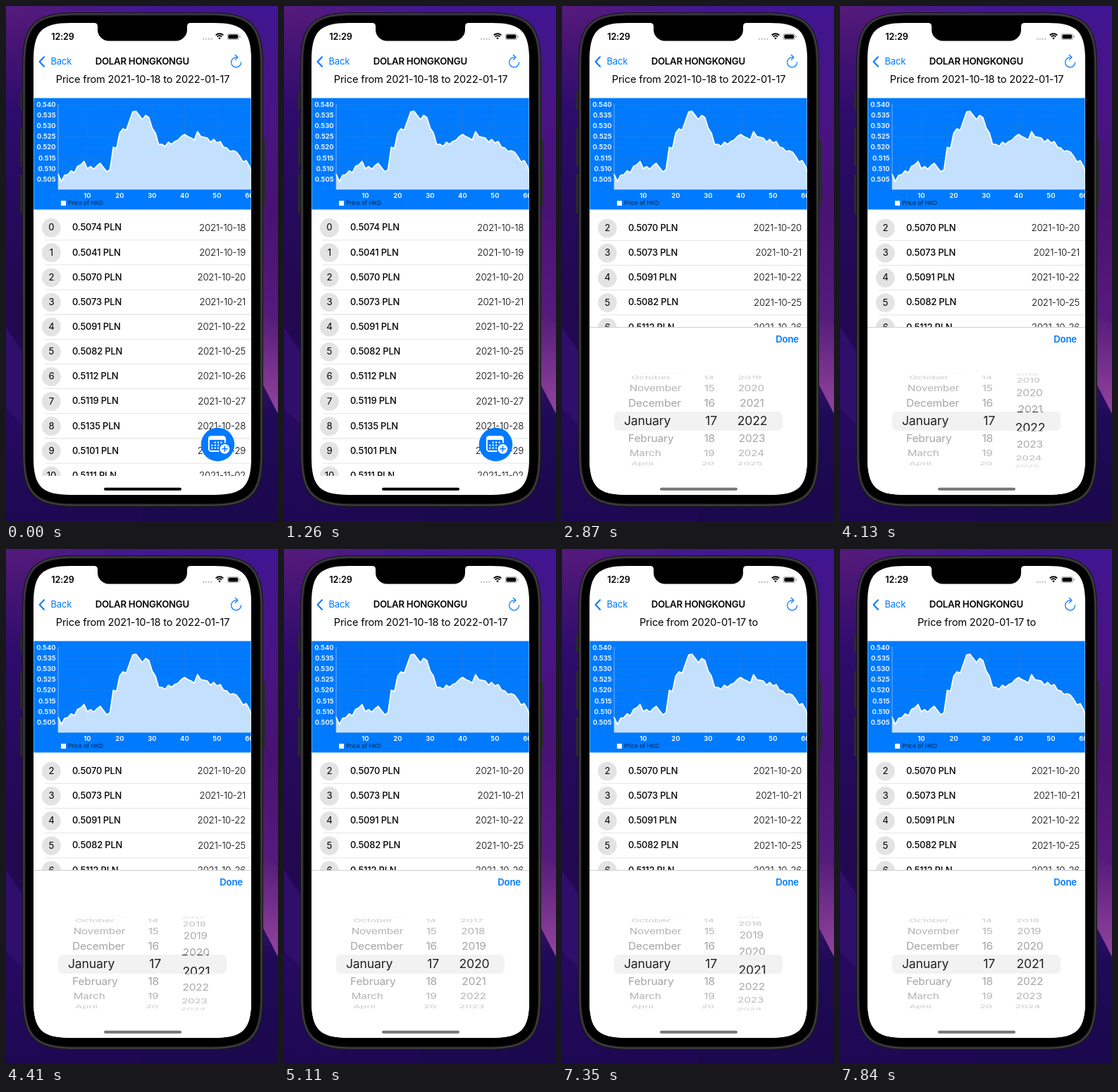
Animation, 386 px wide and 730 px high, one loop 8000 ms. Source, as an HTML page with a canvas:

```html
<!DOCTYPE html>
<html lang="en">
<head>
<meta charset="utf-8">
<title>Currency price history</title>
<style>
html, body { margin: 0; height: 100%; overflow: hidden; background: #1d0848; }
canvas { display: block; width: 386px; height: 730px; }
</style>
</head>
<body>
<canvas id="stage"></canvas>
<script>
const W = 386, H = 730, LOOP = 8000, TICK = 70;
const BLUE = '#007aff';
const canvas = document.getElementById('stage');
const ctx = canvas.getContext('2d');
const dpr = window.devicePixelRatio || 1;
canvas.width = W * dpr;
canvas.height = H * dpr;

const prices = [5074, 5041, 5070, 5073, 5091, 5082, 5112, 5119, 5135, 5101, 5111, 5099, 5115, 5126];
const dates = ['10-18', '10-19', '10-20', '10-21', '10-22', '10-25', '10-26', '10-27', '10-28', '10-29',
  '11-02', '11-03', '11-04', '11-05'];
// Chart heights in pixels that continue the listed prices
const later = [229, 235, 232, 200, 202, 180, 174, 176, 163, 150, 149, 155, 161, 155, 158, 173, 180, 196, 196,
  199, 193, 196, 192, 190, 185, 182, 185, 187, 190, 178, 185, 186, 187, 193, 189, 194, 192, 200, 201, 206,
  205, 207, 213, 221, 219, 227, 240];
const curve = prices.map(p => 246 - (p - 5050) * 0.303).concat(later);
const months = ['January', 'February', 'March', 'April', 'May', 'June', 'July', 'August', 'September',
  'October', 'November', 'December'];

const mod = (n, m) => ((n % m) + m) % m;
const progress = (t, from, to) => Math.min(1, Math.max(0, (t - from) / (to - from)));
const easeOut = (p, power) => 1 - (1 - p) ** power;

function text(str, x, y, size, { color = '#000', weight = 400, align = 'left', spacing = -0.15 } = {}) {
  ctx.font = `${weight} ${size}px Inter, sans-serif`;
  ctx.letterSpacing = spacing + 'px';
  ctx.textAlign = align;
  ctx.textBaseline = 'middle';
  ctx.fillStyle = color;
  ctx.fillText(str, x, y);
}

function box(x, y, w, h, radius, color) {
  ctx.beginPath();
  ctx.roundRect(x, y, w, h, radius);
  ctx.fillStyle = color;
  ctx.fill();
}

// Rectangle path with continuous-curvature corners, as on the phone body
function smoothRect(x, y, w, h, radius) {
  const e = 1.4 * radius, c = 0.31 * radius, r = x + w, b = y + h;
  ctx.beginPath();
  ctx.moveTo(x + e, y);
  ctx.lineTo(r - e, y);
  ctx.bezierCurveTo(r - c, y, r, y + c, r, y + e);
  ctx.lineTo(r, b - e);
  ctx.bezierCurveTo(r, b - c, r - c, b, r - e, b);
  ctx.lineTo(x + e, b);
  ctx.bezierCurveTo(x + c, b, x, b - c, x, b - e);
  ctx.lineTo(x, y + e);
  ctx.bezierCurveTo(x, y + c, x + c, y, x + e, y);
}

function disc(x, y, r, color) {
  ctx.beginPath();
  ctx.arc(x, y, r, 0, 7);
  ctx.fillStyle = color;
  ctx.fill();
}

function line(points, color, width) {
  ctx.beginPath();
  points.forEach(([x, y]) => ctx.lineTo(x, y));
  ctx.strokeStyle = color;
  ctx.lineWidth = width;
  ctx.stroke();
}

function shape(points, color) {
  ctx.beginPath();
  points.forEach(([x, y]) => ctx.lineTo(x, y));
  ctx.fillStyle = color;
  ctx.fill();
}

function clipped(x, y, w, h, radius, draw) {
  ctx.save();
  ctx.beginPath();
  ctx.roundRect(x, y, w, h, radius);
  ctx.clip();
  draw();
  ctx.restore();
}

function gradient(x0, y0, x1, y1, colors) {
  const g = ctx.createLinearGradient(x0, y0, x1, y1);
  colors.forEach((c, i) => g.addColorStop(i / (colors.length - 1), c));
  return g;
}

function drawWallpaper() {
  box(0, 0, 193, H, 0, gradient(0, 0, 0, H, ['#551a7a', '#2e0c6c', '#250a5c', '#21084f', '#260a60', '#1d0852']));
  box(193, 0, 193, H, 0, gradient(0, 0, 0, H, ['#401590', '#481484', '#481272', '#551a7d', '#1f0a58', '#1b084c']));
  box(0, 0, W, 12, 0, gradient(0, 0, W, 0, ['#551a7a', '#40188f', '#3f1592']));
  shape([[0, 455], [30, 500], [30, 600], [0, 570]], '#300e6c');
  shape([[355, 420], [386, 450], [386, 578], [355, 518]], gradient(0, 420, 0, 570, ['#4d1674', '#8f429c']));
}

function drawPhone() {
  [[121, 26], [173, 54], [238, 56]].forEach(([y, h]) => box(20, y, 5, h, 1.5, '#29292b'));
  box(363, 189, 5, 94, 1.5, '#29292b');
  ['#19191b', '#434345', '#29292b', '#000'].forEach((color, i) => {
    const inset = i * 1.5;
    smoothRect(23 + inset, 9 + inset, 342 - 2 * inset, 701 - 2 * inset, 54 - inset);
    ctx.fillStyle = color;
    ctx.fill();
  });
}

function drawStatusBar() {
  ctx.beginPath();
  ctx.moveTo(125, 24);
  ctx.quadraticCurveTo(130, 24, 130, 29);
  ctx.lineTo(130, 33);
  ctx.arcTo(130, 49.4, 146, 49.4, 16);
  ctx.lineTo(241, 49.4);
  ctx.arcTo(257, 49.4, 257, 33, 16);
  ctx.lineTo(257, 29);
  ctx.quadraticCurveTo(257, 24, 262, 24);
  ctx.fillStyle = '#000';
  ctx.fill();

  text('12:29', 80.5, 44, 12.6, { weight: 600, align: 'center' });
  for (let i = 0; i < 4; i++) disc(280 + i * 3.8, 46.7, 1.2, '#c4c4c6');
  ctx.strokeStyle = '#000';
  ctx.lineWidth = 1.9;
  [8, 5].forEach(r => {
    ctx.beginPath();
    ctx.arc(303, 47.3, r, -2.3, -0.84);
    ctx.stroke();
  });
  shape([[301.2, 45.3], [303, 44.6], [304.8, 45.3], [303, 47.4]], '#000');
  box(313.8, 39, 17, 9, 2.8, '#a0a0a0');
  box(314.6, 39.8, 15.4, 7.4, 2.2, '#fff');
  box(315.4, 40.6, 13.8, 5.8, 1.6, '#000');
  box(331.6, 42, 1.2, 3, 0.6, '#a0a0a0');
}

function drawHeader(caption) {
  ctx.lineCap = ctx.lineJoin = 'round';
  line([[54, 72.2], [47.6, 79], [54, 85.8]], BLUE, 2);
  text('Back', 63.4, 79, 13, { color: BLUE });
  text('DOLAR HONGKONGU', 193.3, 79, 13.2, { weight: 600, align: 'center', spacing: -0.25 });
  ctx.beginPath();
  ctx.arc(326.6, 79.8, 7, 0, 4.8);
  ctx.strokeStyle = BLUE;
  ctx.lineWidth = 1.2;
  ctx.stroke();
  line([[325.2, 69.2], [329, 72.8], [325.2, 76.4]], BLUE, 1.2);
  text(caption, 194, 105, 14.6, { align: 'center', spacing: -0.17 });
}

function drawChart() {
  const left = 74, bottom = 260, grid = 'rgba(128,128,128,.26)';
  const points = curve.map((y, i) => [left + i * 4.6, y]);
  box(39.4, 130.4, 308.2, 158.2, 0, BLUE);
  for (let i = 0; i < 8; i++) {
    const y = 140 + i * 15.15;
    line([[left, y], [348, y]], grid, 0.8);
    text((0.54 - i * 0.005).toFixed(3), 70.5, y, 9.5, { color: '#fff', weight: 600, align: 'right', spacing: 0 });
  }
  for (let i = 1; i <= 6; i++) {
    const x = 69.4 + i * 46;
    line([[x, 139], [x, bottom]], grid, 0.8);
    text(i * 10, x, 269, 9.5, { color: '#fff', weight: 600, align: 'center', spacing: 0 });
  }
  shape([[left, bottom], ...points, [360, bottom]], 'rgba(255,255,255,.77)');
  line(points, '#fff', 1.7);
  line([[left, 139], [left, bottom], [348, bottom]], 'rgba(200,215,235,.7)', 0.8);
  box(78, 276, 7, 7, 0, '#fff');
  text('Price of HKD', 88, 279.7, 8.2, { color: '#04213f', spacing: 0 });
}

function drawList(offset) {
  clipped(39, 298, 309, 368, 0, () => {
    prices.forEach((price, i) => {
      const y = 314.5 + i * 35.15 - offset;
      if (y < 270 || y > 690) return;
      disc(64.3, y, 13.4, '#e3e3e3');
      text(i, 64.4, y, 13.2, { align: 'center' });
      text(`0.${price} PLN`, 94, y, 12.9, { weight: 500, spacing: -0.15 });
      text('2021-' + dates[i], 340, y, 13.3, { weight: 300, align: 'right', spacing: -0.27 });
      box(55, y + 16.9, 293, 0.8, 0, '#dcdcde');
    });
  });
}

function drawCalendarButton(alpha) {
  disc(300.5, 621.6, 23.8, BLUE);
  ctx.save();
  ctx.globalAlpha = alpha;
  ctx.beginPath();
  ctx.roundRect(287.9, 610.4, 23, 20.6, 3.5);
  ctx.strokeStyle = '#fff';
  ctx.lineWidth = 1.9;
  ctx.stroke();
  box(287, 609.5, 24.8, 5.4, [3.5, 3.5, 0, 0], '#fff');
  for (let row = 0; row < 3; row++)
    for (let col = 0; col < 4; col++)
      if (row + col) box(291.2 + col * 4.4, 617.4 + row * 4, 2.3, 2.3, 0.7, '#fff');
  ctx.restore();
  disc(310.4, 627.8, 8.6, BLUE);
  ctx.save();
  ctx.globalAlpha = alpha;
  disc(310.4, 627.8, 6.9, '#fff');
  ctx.restore();
  line([[306.8, 627.8], [314, 627.8]], BLUE, 1.5);
  line([[310.4, 624.2], [310.4, 631.4]], BLUE, 1.5);
}

// One picker column, its rows placed around a horizontal cylinder
function drawWheel({ x, align, pos, label }, shade) {
  for (let k = Math.floor(pos) - 4; k <= Math.ceil(pos) + 4; k++) {
    const angle = (k - pos) * 0.384, c = Math.cos(angle);
    if (Math.abs(angle) > 1.56) continue;
    const s = 1 - 0.08 * (1 - c);
    ctx.save();
    ctx.translate(193, 588.5 + 66.7 * Math.sin(angle));
    ctx.scale(s, c);
    text(label(k), x - 193, 0, 15.6, { color: shade(c), align });
    ctx.restore();
  }
}

function drawSheet(dy, year, doneAlpha) {
  const columns = [
    { x: 93.5, align: 'left', pos: 0, label: k => months[mod(k, 12)], lens: 136 },
    { x: 217.2, align: 'right', pos: 17, label: k => k, lens: 196 },
    { x: 270, align: 'center', pos: year, label: k => k, lens: 270 }
  ];
  ctx.save();
  ctx.translate(0, dy);
  box(39, 455, 309, 240, 0, '#fff');
  box(39, 455, 309, 0.9, 0, '#cfcfd1');
  ctx.globalAlpha = doneAlpha;
  text('Done', 336, 472.7, 13.2, { color: BLUE, weight: 600, align: 'right' });
  ctx.globalAlpha = 1;
  clipped(39, 517.5, 309, 141, 0, () =>
    columns.forEach(col => drawWheel(col, c => `rgba(0,0,0,${0.1 + 0.28 * c})`)));
  clipped(74, 575, 239, 27, 6.5, () => {
    box(74, 575, 239, 27, 0, '#f2f2f3');
    columns.forEach(col => {
      ctx.save();
      ctx.translate(col.lens, 588.5);
      ctx.scale(1.13, 1.13);
      ctx.translate(-col.lens, -588.5);
      drawWheel(col, () => '#222');
      ctx.restore();
    });
  });
  ctx.restore();
}

function draw(t) {
  const scroll = 69.7 * easeOut(progress(t, 1330, 1540), 1.6);
  const sheet = easeOut(progress(t, 2520, 2870), 3);
  const forward = progress(t, 7070, 7840);
  const year = 2022 - 2 * easeOut(progress(t, 4060, 5250), 3.36) + easeOut(forward, 2.6);
  const iconAlpha = t < 2450 ? 1 : 0.3 + 0.7 * progress(t, 2590, 3000);
  const doneAlpha = t < 5810 ? 1 : 0.3 + 0.7 * progress(t, 5880, 6370);
  const caption = t < 5950 ? 'Price from 2021-10-18 to 2022-01-17' : 'Price from 2020-01-17 to';

  ctx.setTransform(dpr, 0, 0, dpr, 0, 0);
  drawWallpaper();
  drawPhone();
  ctx.save();
  smoothRect(39, 24, 309, 669, 38);
  ctx.clip();
  box(39, 24, 309, 669, 0, '#fff');
  drawStatusBar();
  drawHeader(caption);
  drawChart();
  drawList(scroll);
  if (t >= 1400 && t < 2590) box(343.2, 296 + scroll * 0.2, 2.6, 62, 1.3, 'rgba(0,0,0,.38)');
  drawCalendarButton(iconAlpha);
  if (sheet > 0) drawSheet(238 * (1 - sheet), year, doneAlpha);
  box(139, 682.8, 110, 4, 2, sheet > 0 ? '#767678' : '#000');
  ctx.restore();
}

function frame(now) {
  draw(Math.floor(now % LOOP / TICK) * TICK);
  requestAnimationFrame(frame);
}
requestAnimationFrame(frame);
</script>
</body>
</html>
```
